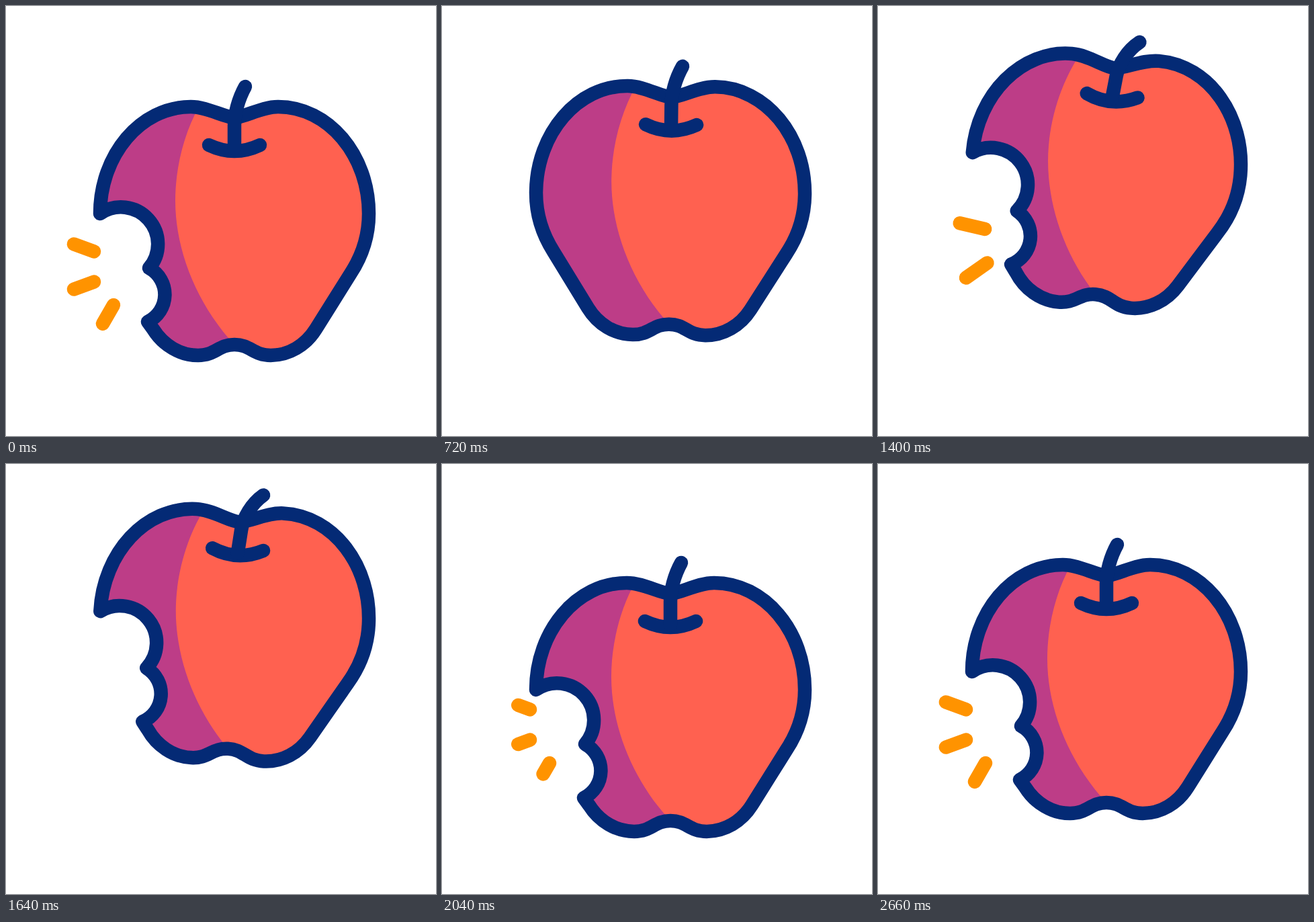
Recreate the animation shown at these times as an HTML page. Size 640 by 640 pixels, loop 2.92 s.

```html
<!DOCTYPE html>
<html lang="en">
<head>
<meta charset="utf-8">
<title>Bitten apple</title>
<style>
  html, body { margin: 0; width: 100%; height: 100%; overflow: hidden; background: #fff; }
  svg { display: block; width: 100vw; height: 100vh; fill: none; stroke-width: 20.5; stroke-linecap: round; stroke-linejoin: round; }
</style>
</head>
<body>
<svg viewBox="0 0 640 640">
  <defs>
    <path id="shape"/>
    <clipPath id="inside"><use href="#shape"/></clipPath>
  </defs>
  <g id="apple">
    <g clip-path="url(#inside)">
      <path fill="#ff6150" d="M120 130H560V540H120Z"/>
      <path fill="#bd3d87" d="M287 150C266 188 252 238 252 290C252 365 285 445 340 504V540H120V130H287Z"/>
    </g>
    <g stroke="#042a75">
      <use href="#shape"/>
      <path d="M302 207Q340 225 378 207"/>
      <path id="stem"/>
    </g>
  </g>
  <path id="sparks" stroke="#ff9300"/>
</svg>
<script>
const LOOP = 2920, START = 220, BITE_1 = 890, BITE_2 = 1300;

const byId = id => document.getElementById(id);
const clamp = x => Math.min(1, Math.max(0, x));
const mix = (a, b, p) => a + (b - a) * p;
const progress = (t, from, to) => clamp((t - from) / (to - from));
const ease = (t, from, to) => {
  const p = progress(t, from, to);
  return p * p * (3 - 2 * p);
};

// Rises from a to b, holds, and falls from c to d
const hump = (t, a, b, c, d) => ease(t, a, b) - ease(t, c, d);

// Turning points of the vertical bounce: [time, offset]
const BOUNCES = [[220, 0], [545, 38.5], [845, -71], [1020, -63], [1650, -80], [1970, 33], [2320, -24], [2660, 0]];
const lift = t => BOUNCES.slice(1).reduce((y, [end, target], i) =>
  y + (target - BOUNCES[i][1]) * ease(t, BOUNCES[i][0], end), 0);

// Right half of the apple as Bezier points from top to bottom; the left half mirrors it
const right = [[340, 166], [355, 166], [380, 150], [405, 150], [480, 150], [540, 222], [540, 309],
  [540, 342], [530, 372], [513, 398], [496, 425], [478, 454], [461, 481],
  [446, 505], [421, 520], [394, 520], [368, 520], [364, 504], [340, 504]];
const left = right.map(([x, y]) => [680 - x, y]).reverse();

const [first, ...rest] = [...left.slice(12), ...right.slice(1), ...left.slice(1, 7)];
const BODY = `M${first}C${rest.join(' ')}`;
const WHOLE = `${BODY} ${left.slice(7, 13).join(' ')}Z`;
const ONE_BITE = `${BODY}L171 407A55 55 0 1 0 ${first}Z`;
const TWO_BITES = `${BODY}L211 470A45 45 0 0 0 213 390A55 55 0 0 0 ${first}Z`;

// Rays fanning out from x, y between two radii; step shifts each further ray outwards
const BURSTS = [
  { start: 910, x: 168, y: 278, angle: 201, turn: 43, count: 2, inner: 60, outer: 122, step: -10 },
  { start: 1310, x: 216, y: 345, angle: 193, turn: 48, count: 2, inner: 48, outer: 101, step: 7 },
  { start: 2000, x: 193, y: 388, angle: 200, turn: 40, count: 3, inner: 66, outer: 98, step: 0, stays: true }
];

function burstPath({ start, x, y, angle, turn, count, inner, outer, step, stays }, t) {
  const head = 1 - (1 - progress(t, start, start + 160)) ** 3;
  const tail = stays ? 0 : progress(t, start + 60, start + 220);
  if (tail >= head) return '';
  let d = '';
  for (let i = 0; i < count; i++) {
    const a = (angle - i * turn) * Math.PI / 180;
    const point = p => {
      const r = mix(inner, outer, p) + i * step;
      return [x + r * Math.cos(a), y + r * Math.sin(a)];
    };
    d += `M${point(tail)}L${point(head)}`;
  }
  return d;
}

function draw(now) {
  let t = now % LOOP;
  if (t < START) t += LOOP;
  const tilt = 4.8 * hump(t, 545, 1340, 1500, 1820);
  const bend = 18 * hump(t, 760, 1190, 1650, 1970);
  byId('shape').setAttribute('d', t < BITE_1 ? WHOLE : t < BITE_2 ? ONE_BITE : TWO_BITES);
  byId('apple').setAttribute('transform', `translate(0 ${lift(t)}) rotate(${tilt} 340 310)`);
  byId('stem').setAttribute('d', `M340 212L${340 + 0.2 * bend} 178` +
    `C${340 + 0.3 * bend} 160 ${346 + 0.6 * bend} 138 ${356 + bend} ${120 + 0.25 * bend}`);
  byId('sparks').setAttribute('d', BURSTS.map(burst => burstPath(burst, t)).join(''));
}

const origin = performance.now();
function tick() {
  draw(performance.now() - origin);
  requestAnimationFrame(tick);
}
tick();
</script>
</body>
</html>
```
